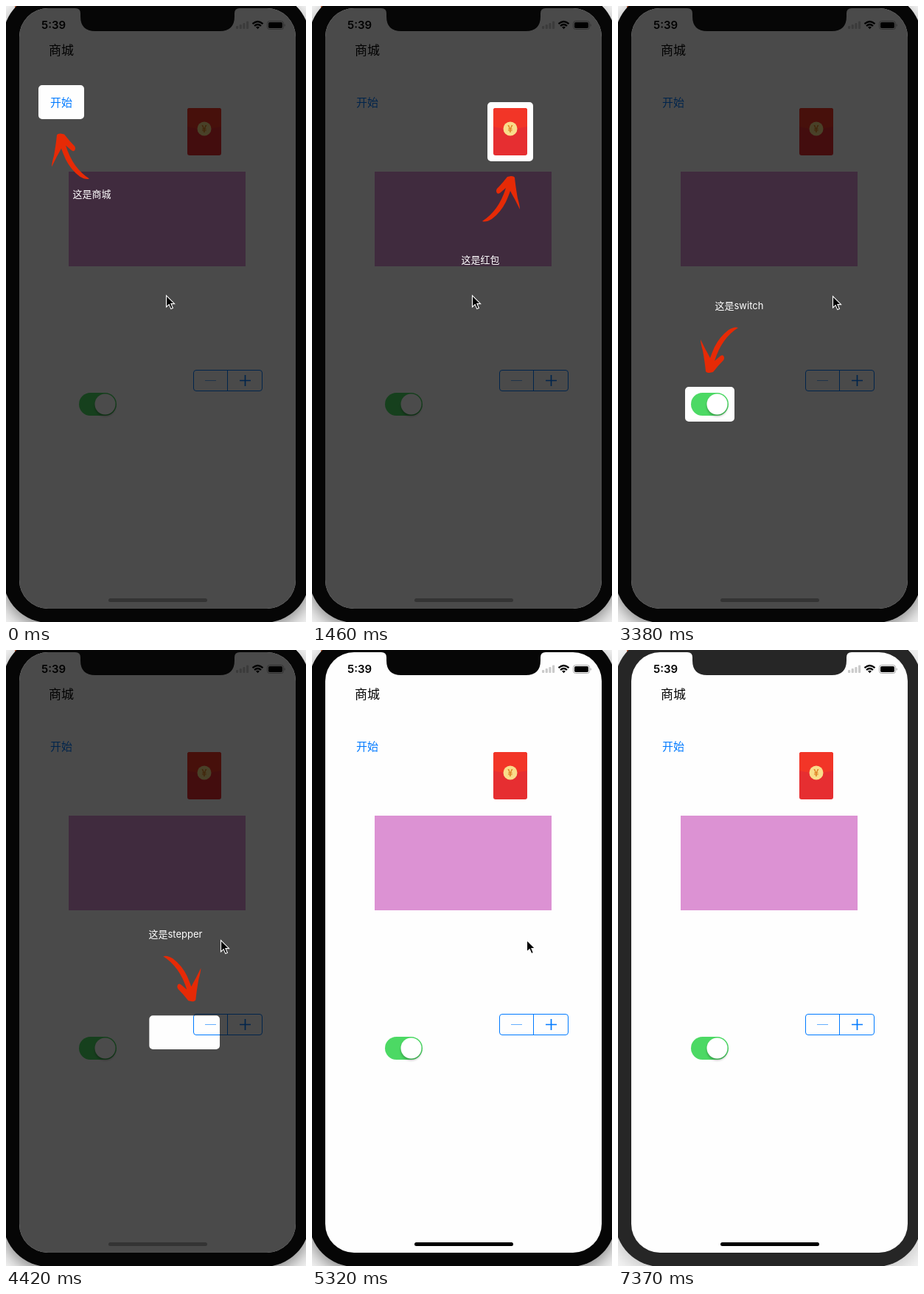
An HTML page that plays this animation: 407x833 px, repeating every 7470 ms.

```html
<!DOCTYPE html>
<html lang="zh-CN">
<head>
<meta charset="utf-8">
<title>新手引导</title>
<style>
html, body { margin: 0; width: 100%; height: 100%; overflow: hidden; background: #f4f4f4; }
svg { display: block; width: 407px; height: 833px; }
text { font-family: Inter, "Noto Sans CJK SC", "Noto Sans CJK JP", sans-serif; }
</style>
</head>
<body>
<svg viewBox="0 0 407 833">
  <defs>
    <clipPath id="screenClip"><rect x="18" y="3" width="375" height="812" rx="39"/></clipPath>
    <filter id="blur" x="-10%" y="-10%" width="120%" height="120%"><feGaussianBlur stdDeviation="12"/></filter>
    <filter id="soft" x="-30%" y="-30%" width="160%" height="160%"><feGaussianBlur stdDeviation="1.5"/></filter>
  </defs>

  <rect width="407" height="833" fill="#f4f4f4"/>
  <rect x="12" width="4" height="3" fill="#c8623c"/>
  <rect id="shadow" x="-4" y="-6" width="416" height="846" rx="62" filter="url(#blur)"/>
  <rect class="bezel" x="-4" y="-18" width="416" height="852" rx="62"/>

  <g clip-path="url(#screenClip)">
    <rect x="18" y="3" width="375" height="812" fill="#fefefe"/>

    <text x="48" y="31.3" font-size="15" font-weight="600">5:39</text>
    <g fill="#cbcbcb">
      <rect x="312" y="27" width="3.2" height="4" rx="1"/>
      <rect x="316.7" y="25" width="3.2" height="6" rx="1"/>
      <rect x="321.3" y="23" width="3.2" height="8" rx="1"/>
      <rect x="326" y="20.5" width="3.2" height="10.5" rx="1"/>
    </g>
    <g fill="none" stroke="#000" stroke-width="2.3">
      <path d="M334.5 24.2Q341.5 17.8 348.5 24.2"/>
      <path d="M337 27Q341.5 23 346 27"/>
    </g>
    <path d="M339 28.6Q341.5 26.8 344 28.6L341.5 31.2Z"/>
    <rect x="354.5" y="20.5" width="22" height="11" rx="3" fill="none" stroke="#a5a5a5"/>
    <rect x="356" y="22" width="19" height="8" rx="1.8"/>
    <path d="M377.7 24Q380 26 377.7 28Z" fill="#a5a5a5"/>

    <text x="58" y="66" font-size="17">商城</text>
    <text x="60" y="135.6" font-size="15" fill="#007aff">开始</text>

    <rect x="246" y="138" width="46" height="64" rx="3" fill="#e62e31"/>
    <path d="M246 163V141Q246 138 249 138H289Q292 138 292 141V163Q269 169 246 163Z" fill="#f23527"/>
    <circle cx="269" cy="166" r="9.5" fill="#f9dd8a"/>
    <text x="269" y="171" font-size="13" font-weight="600" text-anchor="middle" fill="#e0872a">¥</text>

    <rect x="85" y="224" width="240" height="128" fill="#dc92d3"/>

    <rect x="99" y="523" width="51" height="31" rx="15.5" fill="#4cd964"/>
    <circle cx="134.5" cy="541" r="14" opacity=".25" filter="url(#soft)"/>
    <circle cx="134.5" cy="538.5" r="14" fill="#fff"/>

    <g fill="none" stroke="#007aff">
      <rect x="254.5" y="492.5" width="93" height="28" rx="3.5"/>
      <path d="M300.5 492V521"/>
      <path d="M270 506.5H285" opacity=".6"/>
      <path d="M317 506.5H332M324.5 499V514" stroke-width="1.7"/>
    </g>

    <g id="guide">
      <path id="mask" fill-rule="evenodd" fill-opacity=".706"/>
      <path id="arrow" fill="#e62a06" d="M7 3Q8 1 12 1L17 2Q24 11 31 18Q33 21 31 24Q29 26 26 23L19 17Q24 33 32 44Q40 55 51 62Q46 64 38 59Q26 50 19 36Q15 27 13 21Q10 27 7 32Q4 38 0 46Q0 41 3 31Q6 14 7 3Z"/>
      <text id="label" font-size="13" fill="#fff"></text>
    </g>
    <rect id="home" x="139" y="801" width="134" height="5" rx="2.5"/>
  </g>

  <path class="bezel" d="M94 2V3Q101 3 101 10V14Q101 34 121 34H290Q310 34 310 14V10Q310 3 317 3V2Z"/>
  <path id="cursor" d="M.5 .5V16L4.2 12.6L6.8 18.6L9.4 17.5L6.9 11.6H11.6Z" stroke="#fff" stroke-width="1.1"/>
</svg>

<script>
const LOOP = 7470, TICK = 147;
const $ = id => document.getElementById(id);
const bezels = document.querySelectorAll('.bezel');

// hole: x, y, w, h; arrow: centre and flips; label: left and baseline
const tips = [
  { hole: [44, 107, 62, 46],   arrow: [87.5, 203.5], flip: [1, 1],   at: [90.5, 259],  text: '这是商城' },
  { hole: [50, 41, 50, 37],    arrow: [87.5, 128],   flip: [1, 1],   at: [90.5, 193],  text: '这是商城' },
  { hole: [238, 130, 62, 80],  arrow: [256.5, 261],  flip: [-1, 1],  at: [202.5, 348], text: '这是红包' },
  { hole: [77, 216, 256, 144], arrow: [218.5, 411],  flip: [1, 1],   at: [204, 475],   text: '这是紫色View' },
  { hole: [91, 515, 67, 47],   arrow: [137.5, 465],  flip: [1, -1],  at: [131.5, 410], text: '这是switch' },
  { hole: [246, 484, 110, 45], arrow: [289.5, 434],  flip: [-1, -1], at: [224.5, 379], text: '这是stepper' },
];
// start time and number of steps of each move to the next tip
const moves = [[270, 3], [1010, 4], [2050, 3], [2790, 3], [4130, 3]];

// time, x, y of the pointer
const pointer = [
  [0, 217, 391], [3090, 242, 391], [3230, 272, 392], [3380, 291, 392],
  [5920, 290, 405], [6070, 285, 455], [6220, 277, 548], [6360, 270, 634],
  [6510, 275, 693], [6660, 291, 752], [6810, 320, 808], [6960, 327, 850],
];

const mix = (a, b, k) => a.map((v, i) => v + (b[i] - v) * k);

function roundRect([x, y, w, h], r = 5) {
  const arc = (dx, dy) => `a${r} ${r} 0 0 1 ${dx} ${dy}`;
  return `M${x + r} ${y}h${w - 2 * r}${arc(r, r)}v${h - 2 * r}${arc(-r, r)}` +
         `h${2 * r - w}${arc(-r, -r)}v${2 * r - h}${arc(r, -r)}z`;
}

function drawGuide(t) {
  const index = moves.filter(([start]) => t >= start).length;
  const to = tips[index], from = tips[Math.max(0, index - 1)];
  let k = 1;
  if (index) {
    const [start, steps] = moves[index - 1];
    k = Math.min(1, (Math.floor((t - start) / TICK) + 1) / steps);
  }
  const [ax, ay] = mix(from.arrow, to.arrow, k);
  const [lx, ly] = mix(from.at, to.at, k);
  $('mask').setAttribute('d', 'M18 3H393V815H18Z' + roundRect(mix(from.hole, to.hole, k)));
  $('arrow').setAttribute('transform', `translate(${ax} ${ay}) scale(${to.flip}) translate(-25.5 -32)`);
  $('label').setAttribute('x', lx);
  $('label').setAttribute('y', ly);
  $('label').textContent = to.text;
  $('guide').setAttribute('opacity', t < 5170 ? 1 : t < 5320 ? 0.82 : 0);
  $('home').setAttribute('fill', t < 5170 ? '#343434' : t < 5320 ? '#202220' : '#000');
}

function draw(t) {
  drawGuide(t);
  const [, x, y] = pointer.filter(p => t >= p[0]).pop();
  $('cursor').setAttribute('transform', `translate(${x} ${y})`);
  const inactive = t >= 7370;
  bezels.forEach(b => b.setAttribute('fill', inactive ? '#262626' : '#060606'));
  $('shadow').setAttribute('opacity', inactive ? 0.2 : 0.5);
}

function loop() {
  draw(performance.now() % LOOP);
  requestAnimationFrame(loop);
}
loop();
</script>
</body>
</html>
```
